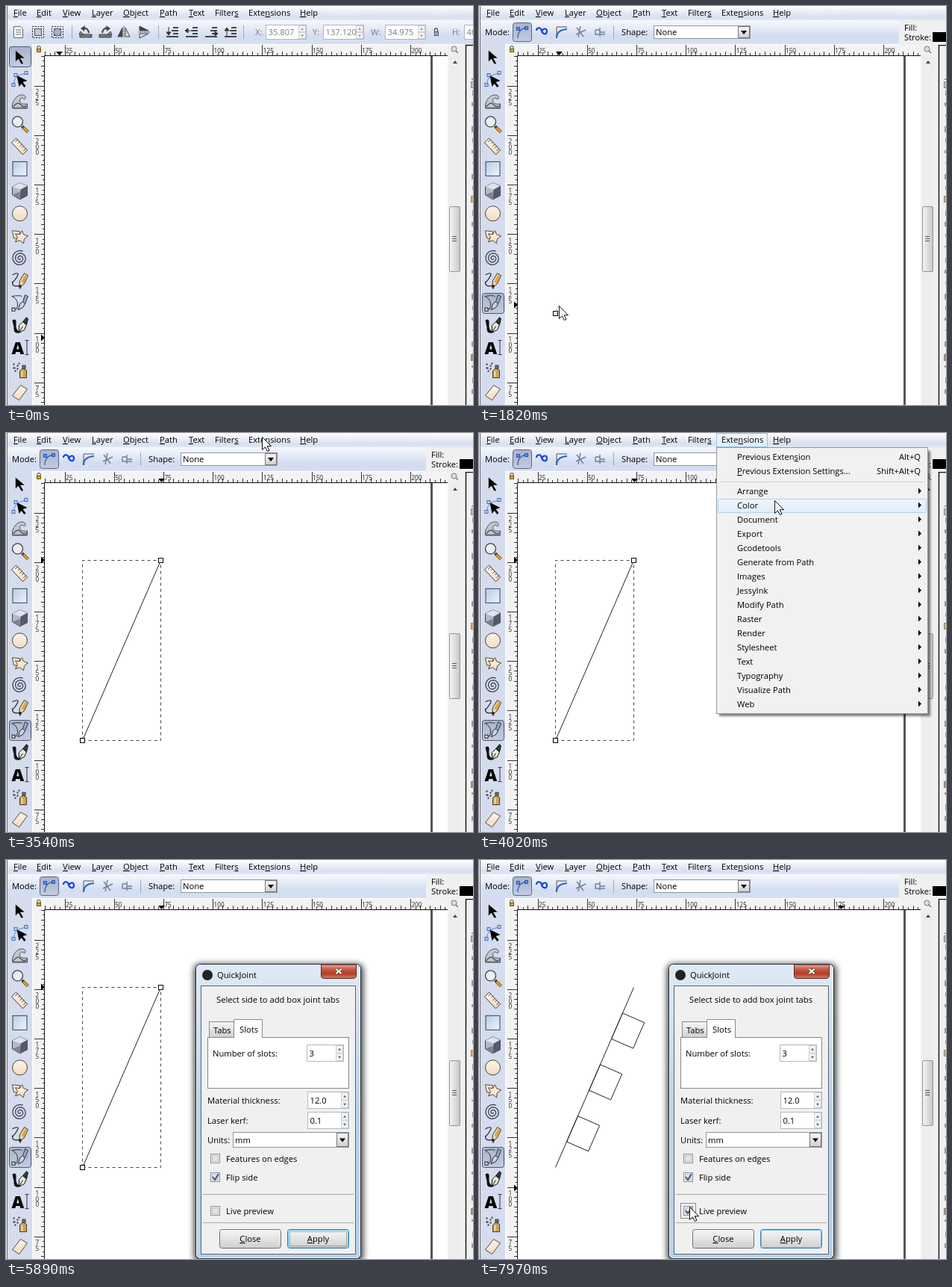
An HTML page that plays this animation: 626 px wide and 534 px high, repeating every 8000 ms.

```html
<!DOCTYPE html>
<html lang="en">
<head>
<meta charset="utf-8">
<title>Drawing a line and adding slots</title>
<style>
html,body{margin:0;width:100%;height:100%;overflow:hidden;background:#fff}
svg{display:block;width:626px;height:534px}
text{font:11.2px "Open Sans","Noto Sans",sans-serif;white-space:pre}
</style>
</head>
<body>
<svg id="stage" viewBox="0 0 626 534"></svg>
<script>
const rect = (x, y, w, h, fill, stroke, extra = '') => {
  const o = stroke ? .5 : 0;
  return `<rect x="${x + o}" y="${y + o}" width="${w - 2 * o}" height="${h - 2 * o}" fill="${fill}" stroke="${stroke || 'none'}" ${extra}/>`;
};
const path = (d, fill = 'none', stroke = 'none', width = 1, extra = '') =>
  `<path d="${d}" fill="${fill}" stroke="${stroke}" stroke-width="${width}" ${extra}/>`;
const circle = (x, y, r, fill = 'none', stroke = 'none', width = 1) =>
  `<circle cx="${x}" cy="${y}" r="${r}" fill="${fill}" stroke="${stroke}" stroke-width="${width}"/>`;
// An underscore underlines the letter after it.
const text = (x, y, s, fill = '#000', extra = '') =>
  `<text x="${x}" y="${y}" fill="${fill}" ${extra}>${s.replace(/_(.)/, '<tspan text-decoration="underline">$1</tspan>')}</text>`;
const group = (id, ...parts) => `<g id="${id}">${parts.join('')}</g>`;
const at = (x, y, ...parts) => `<g transform="translate(${x} ${y})">${parts.join('')}</g>`;
const gradient = (id, ...colors) => `<linearGradient id="${id}" x2="0" y2="1">${colors.map((c, i) =>
  `<stop offset="${i / (colors.length - 1)}" stop-color="${c}"/>`).join('')}</linearGradient>`;
const range = n => [...Array(n).keys()];

const defs = `<defs>${[
  gradient('menubar', '#ffffff', '#f2f4fa', '#e5eaf5', '#d8dfef', '#e1e6f6'),
  gradient('bar', '#f6f8fd', '#e6ebf7', '#d3ddf1', '#d6dff1'),
  gradient('tan', '#fdf4e8', '#f0dcc0'),
  gradient('glass', '#dfeaf5', '#bcd2e8', '#b9d1ea'),
  gradient('close', '#e3ab9e', '#c75a45', '#b63a24', '#d48265'),
  gradient('button', '#f4f4f4', '#ebebeb', '#dcdcdc', '#cfcfcf'),
  gradient('active', '#a9b3cc', '#c2cbe0'),
  gradient('hover', '#f0f6fc', '#dfedfa')
].join('')}
<linearGradient id="sky" y2="1"><stop stop-color="#b4cce4"/><stop offset="1" stop-color="#f0f5fa"/></linearGradient>
<linearGradient id="thumb"><stop stop-color="#f5f5f5"/><stop offset=".5" stop-color="#dedede"/><stop offset="1" stop-color="#c6c6c6"/></linearGradient>
<filter id="soft" x="-20%" y="-20%" width="140%" height="140%"><feGaussianBlur stdDeviation="4"/></filter>
<filter id="thin"><feGaussianBlur stdDeviation="1.5"/></filter></defs>`;

// Rulers
const UNIT = 66.2;
function rulers() {
  let ticks = '', labels = '';
  const length = i => i % 10 === 0 ? 14 : i % 2 === 0 ? 5 : 3;
  for (let i = -4; i < 78; i++) {
    const x = Math.round(78.5 + i * UNIT / 10) + .5;
    if (x > 52 && x < 591) ticks += `M${x} 66v${-length(i)}`;
  }
  for (let i = -6; i < 65; i++) {
    const y = Math.round(106.5 + i * UNIT / 10) + .5;
    if (y > 67) ticks += `M52 ${y}h${-length(i)}`;
  }
  const small = 'style="font-size:8.2px"';
  for (const i of range(8)) labels += text(80 + i * UNIT, 62.5, String(25 + i * 25), '#222', small);
  for (const i of range(7)) [...String(225 - i * 25)].forEach((digit, j) => {
    labels += text(39.5, 118 + i * UNIT + j * 7.6, digit, '#222', small);
  });
  return rect(36, 52, 556, 15, '#f3f3f3') + rect(36, 52, 16, 482, '#f3f3f3') + path(ticks, 'none', '#333') +
    path('M51.5 534V66.5H592', 'none', '#111') + labels +
    path('M42 57v-1.5a2 2 0 0 1 4 0V57', 'none', '#555', 1.2) + rect(41, 57, 6, 5, '#d8a91c', '#6b5310');
}

// Toolbox
const ARROW = 'M0 0V17L4 13.3 6.8 19 9.4 17.8 6.7 12.2H12Z';
function toolbox() {
  const spiral = 'M' + range(60).map(i => {
    const a = i * .3, r = .6 + i * .17;
    return `${(r * Math.cos(a)).toFixed(1)} ${(r * Math.sin(a)).toFixed(1)}`;
  }).join('L');
  const square = (x, y) => rect(x, y, 5, 5, '#bfd4f3', '#3a6cb5');
  const icons = [
    path('M-6-9V7L-2 3 2 10 5 9 1 2H7Z', '#000', '#fff', .5),
    path('M-8 8Q-9-6 9-8', 'none', '#5b87c6') + path('M-4-5L10 2 4 4 8 9 6 11 2 6-1 10Z', '#000') + square(-11, 5) + square(-8, -8) + square(6, -11),
    path('M-10 9V4C-8-4-3-9 3-9 8-9 9-4 6-3 4-6 0-5 0-1 0 3 5 4 10 3V9Z', '#c3c8cd', '#4d5157') + path('M-9 7Q-3-1 1 4T10 5M-9 8.500H10', 'none', '#555b62', 1.5),
    path('M3 3L11 11', 'none', '#5b3e14', 4) + path('M5 5L11 11', 'none', '#e8a52b', 2.5) + circle(-3, -3, 7, '#e9eff3', '#444', 1.3),
    path('M-11-5L-5-11 10 5 4 11Z', 'url(#tan)', '#4a3a2c') + path('M-3-9l-3 3M0-6l-2 2M3-3l-3 3M5 0l-2 2M8 3l-3 3', 'none', '#4a3a2c'),
    rect(-10, -10, 20, 20, 'url(#sky)', '#33425a'),
    path('M-10-6L0-11 10-7V6L0 11-10 5Z', '#b4b9c5', '#444') + path('M-10-6L1-2 10-7 0-11Z', '#e0e3ea') + path('M1-2L10-7V6L0 11Z', '#555a69') + path('M-10 5L0 1 0 11Z', '#7d8392'),
    circle(0, 0, 10, 'url(#tan)', '#4c4034'),
    path('M-10-7L0-6-1 4-8 3Z', 'url(#tan)', '#55452f') + path('M3-7L5-2 11 0 6 4 5 10 0 6-6 8-3 2-6-3 0-2Z', 'url(#tan)', '#55452f'),
    path(spiral, 'none', '#3e4654', 1.3),
    path('M-10-8Q1-13-4-5T-10 2Q-10 8-3 7T0 11', 'none', '#222', 1.2) + path('M-1 9L0 0 6-10 11-7 6 4Z', '#f3dcae', '#333') + path('M2 1L7-8 10-6 5 4Z', '#e2a544') + path('M-1 9L0 5 3 7Z', '#111'),
    path('M-11-9Q0-11 3-9M-10-9Q0-4-4 8L-8 8', 'none', '#333') + path('M-2 9L0 1 4-2 7 1 4 6Z', '#cbd5e1', '#222') + path('M4-2L7-11 11-9 7 1Z', '#8fabc6', '#283848') + rect(-11, 6, 5, 5, '#fff', '#111'),
    path('M-10-7Q-4-11-5-2T2 9Q-9 13-8 2Z', '#111') + path('M-1 9L-1 0 4-5 9-1 6 6Z', '#eee9d6', '#111') + path('M4-5L9-11 11-9 9-1Z', '#2d3f36', '#111') + path('M-1 9L4 1', 'none', '#111'),
    text(-11, 8, 'A', '#000', 'style="font-size:23px;font-weight:800"') + path('M7-10h5M7 9h5M9.5-10V9', 'none', '#333'),
    path('M-9-8h2M-4-6h2M-9-3h3M-4-2h2M-7 1h2M-2-9h2', 'none', '#333', 2) + path('M0 1L4-3 9 0V10H0Z', '#c9a45c', '#4b3717') + path('M3 1V9', 'none', '#f0dca8', 2) + rect(3, -7, 5, 5, '#777', '#333'),
    path('M-10 4L1-10 10-5-1 10Z', 'url(#tan)', '#59493a')
  ];
  return rect(2, 51, 33, 483, '#d4dcee') +
    `<rect id="tool" x="4.5" width="29" height="27" rx="3" fill="url(#active)" stroke="#4d586f"/>` +
    icons.map((icon, i) => at(18.5, 68 + i * 29.97, icon)).join('');
}

// Spin buttons, combo boxes and check boxes
const spinner = (x, y, w, h, value, ink = '#000') => rect(x, y, w, h, '#fff', '#b4b7bd') +
  rect(x + w - 11, y + 1, 10, h / 2 - 1, '#f4f4f4', '#cfcfcf') + rect(x + w - 11, y + h / 2, 10, h / 2 - 1, '#f4f4f4', '#cfcfcf') +
  path(`M${x + w - 8} ${y + h / 4 + 2}l2-3 2 3zM${x + w - 8} ${y + h * .75 - 1.5}l2 3 2-3z`, ink === '#000' ? '#3a6a8c' : '#999') +
  text(x + 3.5, y + h / 2 + 4, value, ink);
const combo = (x, y, w, h, value) => rect(x, y, w, h, '#fff', '#8e97a5') + rect(x + w - 17, y + 1, 16, h - 2, 'url(#button)', '#777') +
  path(`M${x + w - 13} ${y + h / 2 - 2}h8l-4 5z`, '#000') + text(x + 3, y + h / 2 + 4, value);
const box = y => rect(274, y, 13, 13, '#f4f4f4', '#8e8f8f') + rect(276, y + 2, 9, 9, '#e3e6e9', '#b9bec4');
const tick = y => path(`M277 ${y + 6}l3 4 5-8`, 'none', '#3d5488', 2);
const divider = x => path(`M${x}.5 26V44`, 'none', '#9fa9bd');

function pointerBar() {
  const dim = '#7c7c7c', dark = '#454545';
  const selectIcon = x => rect(x - 8, 27, 16, 16, 'none', '#222', 'stroke-dasharray="2 1.5"') + rect(x - 5, 30, 10, 10, '#c4c9d2', '#555');
  const turn = (x, s) => at(x, 35, `<g transform="scale(${s} 1)">${path('M-8 3H8V7H-8Z', '#777', dark) + path('M-4 1Q-3-6 3-5', 'none', dark, 2) + path('M1-9L7-5 2-1Z', dark) + path('M3 3L7-1 9 3Z', '#999', dark)}</g>`);
  const flip = path('M-2-6V6H-8Z', '#444', dark) + path('M2-6V6H8Z', '#ddd', dark) + path('M0-8V8', 'none', dark, 1, 'stroke-dasharray="2 1"');
  const order = (x, d) => at(x, 35, path('M1-6h7M-1-2h9M1 2h7M-8 6H8', 'none', dark, 2), path(d, '#333', '#333', 1));
  return rect(2, 19, 624, 32, 'url(#bar)') +
    path('M10.5 27.5h9l3 3v12h-12zM13 32h7M13 35h7M13 38h7', '#fff', '#666') + selectIcon(43) + selectIcon(69) + circle(69, 35, 5, '#a8b2c2', '#555') +
    divider(88) + turn(107, -1) + turn(133, 1) + at(158, 35, flip) + at(185, 35, `<g transform="rotate(90)">${flip}</g>`) + divider(204) +
    order(223, 'M-5-7V3M-8 0l3 4 3-4z') + order(249, 'M-7-2h5M-5-5l-4 3 4 3z') + order(275, 'M2 2h5M5-1l4 3-4 3z') + order(301, 'M-5 5V-5M-8-2l3-4 3 4z') + divider(318) +
    text(334, 39, 'X:', dim) + spinner(348, 25, 55, 20, '35.807', dim) + text(411, 39, 'Y:', dim) + spinner(425, 25, 55, 20, '137.120', dim) +
    text(489, 39, 'W:', dim) + spinner(508, 25, 55, 20, '34.975', dim) +
    path('M574.500 34v-2a2 2 0 0 1 4 0v2', 'none', '#555', 1.3) + rect(574, 34, 6, 6, '#aaa', '#555') +
    text(598, 39, 'H:', dim) + spinner(614, 25, 55, 20, '40', dim);
}

function penBar() {
  const line = (x, d, color, width) => at(x, 35, path(d, 'none', color, width));
  return rect(2, 19, 561, 32, 'url(#bar)') + rect(563, 19, 63, 33, '#f0f0f0') +
    text(8, 39, 'Mode:') + rect(45, 22, 26, 26, 'url(#active)', '#5d6780', 'rx="3"') +
    line(58, 'M-6 8Q-6-5 7-6', '#3c64b4', 1.3) + rect(50, 28, 5, 5, '#5e8de0', '#2458c0') + rect(61, 27, 5, 5, '#5e8de0', '#2458c0') +
    line(84, 'M-7-2C-7-7-1-7 0-2S7 4 7-1 2-5 1-2', '#1942df', 2.2) + line(110, 'M-6 8Q-6-3 8-4', '#2d63ca', 2) + line(110, 'M-6 8V-7H8', '#555', 1) +
    line(136, 'M-5-6L4 6M7-3L-6 3M-3 7L0-8', '#6f7f9f', 1.4) + line(162, 'M-6-3H0V6M0-6V0H7M-6-3V3H7', '#6f7f9f', 1.4) +
    divider(180) + text(191, 39, 'Shape:') + combo(234, 26, 130, 18, 'None') +
    text(570, 33, 'Fill:') + text(570, 46, 'Stroke:') + rect(608, 35, 18, 13, '#000');
}

const titles = [[10, '_File'], [41, '_Edit'], [76, '_View'], [115, '_Layer'], [157, '_Object'], [206, '_Path'], [245, '_Text'], [280, 'Filter_s'], [325, 'Exte_nsions'], [394, '_Help']];

function side() {
  const scraps = range(27).map(i => rect(624 + i % 2, 97 + i * 16, 2, 2 + i * 5 % 7, '#999')).join('');
  const accents = [[105, '#bbb'], [258, '#d9ad62'], [470, '#b98e6c']].map(([y, c]) => rect(623, y - 4, 4, 9, c, '#888')).join('');
  return rect(592, 52, 34, 482, '#f0f0f0') + rect(569, 67, 3, 467, '#555') +
    rect(594, 67, 15, 467, '#ededed') + rect(594, 268, 15, 88, 'url(#thumb)', '#959595', 'rx="1.5"') +
    path('M598 308.500h6M598 311.500h6M598 314.500h6', 'none', '#555') + path('M599 77l3-4 3 4z', '#444') +
    circle(600.500, 57.500, 3.5, '#ddd', '#777') + path('M603 60l3 3', 'none', '#777', 1.5) +
    path('M626 52.500H616.500V534', 'none', '#111', 1.4) + scraps + accents;
}

// The drawn line and its slots
const A = [102.5, 411.5], B = [207.5, 170.5], DEPTH = 31.8;
const node = ([x, y]) => `<rect x="${x - 3}" y="${y - 3}" width="6" height="6" fill="#fff" stroke="#000"/>`;
function slots() {
  const dx = A[0] - B[0], dy = A[1] - B[1], len = Math.hypot(dx, dy);
  const nx = dy / len * DEPTH, ny = -dx / len * DEPTH;
  return [1, 3, 5].map(k => path(`M${B[0] + dx * k / 7} ${B[1] + dy * k / 7}l${nx} ${ny} ${dx / 7} ${dy / 7} ${-nx} ${-ny}z`, 'none', '#222')).join('');
}

const ITEMS = ['Arrange', 'Color', 'Document', 'Export', 'Gcodetools', 'Generate from Path', 'Images', 'JessyInk', 'Modify Path', 'Raster', 'Render', 'Stylesheet', 'Text', 'Typography', 'Visualize Path', 'Web'];
const rowTop = y => y < 62 ? 22 + 19 * Math.floor((y - 22) / 19) : 69 + 19 * Math.floor((y - 69) / 19);
const highlight = (id, x, w) => `<rect id="${id}" x="${x}.5" width="${w}" height="18" rx="2" fill="url(#hover)" stroke="#aed0f0"/>`;
function menu() {
  const right = 'text-anchor="end"';
  return rect(318, 0, 69, 19, 'url(#hover)', '#9cc3e6') + text(titles[8][0], 13, titles[8][1]) +
    rect(322, 24, 283, 355, '#000', '', 'opacity=".5" filter="url(#thin)"') + rect(318, 19, 284, 357, '#f1f1f1', '#979797') +
    highlight('row', 320, 279) + text(346, 36, 'Previous Exten_sion') + text(592, 36, 'Alt+Q', '#000', right) +
    text(346, 55, '_Previous Extension Settings...') + text(592, 55, 'Shift+Alt+Q', '#000', right) + path('M323 65.500H598', 'none', '#d5d5d5') +
    ITEMS.map((name, i) => text(346, 82 + 19 * i, name) + path(`M589 ${73.5 + 19 * i}l4 4-4 4z`, '#000')).join('');
}
const submenu = () => rect(604, 222, 40, 288, '#000', '', 'opacity=".5" filter="url(#thin)"') + rect(600, 217, 40, 291, '#f1f1f1', '#979797') + highlight('subrow', 602, 40);

function dialog() {
  const button = (x, label, stroke) => rect(x, 494, 83, 26, 'url(#button)', stroke, 'rx="3"') + text(x + 41.5, 511, label, '#000', 'text-anchor="middle"');
  return rect(252, 139, 227, 400, '#000', '', 'rx="8" opacity=".75" filter="url(#soft)"') +
    rect(254, 139, 222, 395, 'url(#glass)', '#202c37', 'rx="6"') + rect(255, 140, 220, 393, 'none', '#eef7ff', 'rx="5"') +
    circle(270, 154, 7, '#222') + text(283, 158, 'QuickJoint') +
    path('M422.500 140V155Q422.500 158.500 426 158.500H465Q469.500 158.500 469.500 154V140Z', 'url(#close)', '#5a2820') +
    path('M442.500 146l7 6M449.500 146l-7 6', 'none', '#553', 4) + path('M442.500 146l7 6M449.500 146l-7 6', 'none', '#fff', 2) +
    rect(261, 168, 208, 360, '#f0f0f0', '#536577') + text(282, 191, 'Select side to add box joint tabs') +
    rect(270, 237, 190, 69, '#fff', '#888') + rect(272, 216, 34, 22, 'url(#button)', '#888') + text(278, 232, 'Tabs') +
    path('M305.500 238V213.500H343.500V238', '#fff', '#888') + text(313, 231, 'Slots') +
    text(277, 263, 'Number of slots:') + spinner(403, 247, 50, 23, '3') +
    text(270, 326, 'Material thickness:') + spinner(404, 310, 56, 23, '12.0') +
    text(270, 353, 'Laser kerf:') + spinner(404, 337, 56, 23, '0.1') +
    text(270, 379, 'Units:') + combo(304, 364, 156, 21, 'mm') +
    box(393) + text(295, 404, 'Features on edges') + box(418) + tick(418) + text(295, 429, 'Flip side') +
    path('M264 447.500H466M264 485.500H466', 'none', '#aaa') + box(463) + text(295, 474, 'Live preview') +
    group('checked', tick(463), rect(270, 459, 21, 21, 'none', '#222', 'stroke-dasharray="1 1"')) +
    button(286, '_Close', '#707070') + button(377, '_Apply', '#3c7fb1') + rect(378, 495, 81, 24, 'none', '#62c5ea', 'rx="2"') +
    group('focus', rect(380, 497, 77, 20, 'none', '#666', 'stroke-dasharray="1 1"'));
}

const stage = document.getElementById('stage');
stage.innerHTML = defs + rect(0, 0, 626, 534, '#fff') + rect(2, 0, 624, 19, 'url(#menubar)') +
  titles.map(([x, s]) => text(x, 13, s)).join('') + toolbox() + rulers() + side() +
  group('pointerBar', pointerBar()) + group('penBar', penBar()) + path('M1.500 0V534', 'none', '#666') +
  path('M-4.500 0h9L0 5z', '#000', 'none', 1, 'id="markX"') + path('M0-4.500v9L5 0z', '#000', 'none', 1, 'id="markY"') +
  group('rubber', `<line id="band" x1="${A[0]}" y1="${A[1]}" stroke="#7df77d"/>`, node(A)) +
  group('line', path(`M${A}L${B}`, 'none', '#222')) +
  group('selection', path(`M${A}V${B[1]}H${B[0]}M${A}H${B[0]}V${B[1]}`, 'none', '#444', 1, 'stroke-dasharray="4 4"'), node(A), node(B)) +
  group('slots', slots()) + group('menu', menu()) + group('submenu', submenu()) + group('dialog', dialog()) +
  path(ARROW, '#fff', '#111', 1, 'id="cursor"');

// Pointer moves: start, end, steps, points; optionally the ruler's left limit and resting place.
const MOVES = [
  { start: 70, end: 720, steps: 9, points: [[319, 479], [8, 400]], limit: 76, rest: [76, 424] },
  { start: 1120, end: 1720, steps: 8, points: [[8, 400], [102, 411]], limit: 52, rest: [76, 424] },
  { start: 1820, end: 2380, steps: 8, points: [[102, 411], [208, 171]], limit: 52, rest: [208, 171] },
  { start: 2680, end: 2750, steps: 2, points: [[208, 171], [275, 116]] },
  { start: 2920, end: 3540, steps: 9, points: [[275, 116], [343, 5]] },
  { start: 3850, end: 4330, steps: 7, points: [[343, 5], [477, 221]] },
  { start: 4720, end: 5260, steps: 8, linear: true, points: [[477, 221], [503, 221], [550, 223], [590, 226], [612, 240], [622, 285], [628, 340], [630, 390], [630, 415]] },
  { start: 5490, end: 5491, steps: 1, points: [[630, 415], [630, 435]] },
  { start: 6290, end: 7040, steps: 11, points: [[607, 423], [280, 469]], limit: 477, rest: [485, 440] },
  { start: 7970, end: 7971, steps: 1, points: [[280, 469], [282, 464]] }
];
const VISIBLE = {
  pointerBar: [0, 950], penBar: [950, 8000], rubber: [1820, 2680], line: [2680, 8000], selection: [2680, 7500],
  slots: [7500, 8000], menu: [3620, 5890], submenu: [4470, 5890], dialog: [5890, 8000], checked: [7120, 8000], focus: [5890, 7120]
};

function along(points, p) {
  const s = p * (points.length - 1), i = Math.min(Math.floor(s), points.length - 2);
  return points[i].map((v, k) => v + (points[i + 1][k] - v) * (s - i));
}

const el = id => document.getElementById(id);
const show = (id, on) => el(id).setAttribute('visibility', on ? 'visible' : 'hidden');
const place = (id, x, y) => el(id).setAttribute('transform', `translate(${x} ${y})`);

function draw(t) {
  let pos = [-50, -50], mark = [71, 445];
  for (const m of MOVES) {
    if (t < m.start) break;
    const step = Math.min(m.steps, Math.floor((t - m.start) / (m.end - m.start) * (m.steps - 1) + 1e-6) + 1);
    const p = step / m.steps;
    pos = along(m.points, m.linear ? p : p * p * (3 - 2 * p)).map(Math.round);
    if (m.rest) mark = pos[0] >= m.limit ? pos : m.rest;
  }
  for (const [id, [from, to]] of Object.entries(VISIBLE)) show(id, t >= from && t < to);
  const [x, y] = pos;
  place('cursor', x + .5, y + .5);
  show('cursor', t >= 70 && (t < 5890 || t >= 6290));
  place('markX', mark[0] + .5, 61);
  place('markY', 47, mark[1] - 1);
  el('tool').setAttribute('y', t < 950 ? 54.5 : 384.5);
  el('band').setAttribute('x2', x - .5);
  el('band').setAttribute('y2', y - .5);
  const open = t >= 3620 && t < 5890;
  el('row').setAttribute('y', (x > 600 ? 221 : rowTop(y)) + .5);
  show('row', open && y > 21);
  el('subrow').setAttribute('y', 220.5 + 19 * Math.floor((y - 220) / 19));
  show('subrow', open && x > 600);
}

const begin = performance.now();
function frame() {
  draw((performance.now() - begin) % 8000);
  requestAnimationFrame(frame);
}
frame();
</script>
</body>
</html>
```
